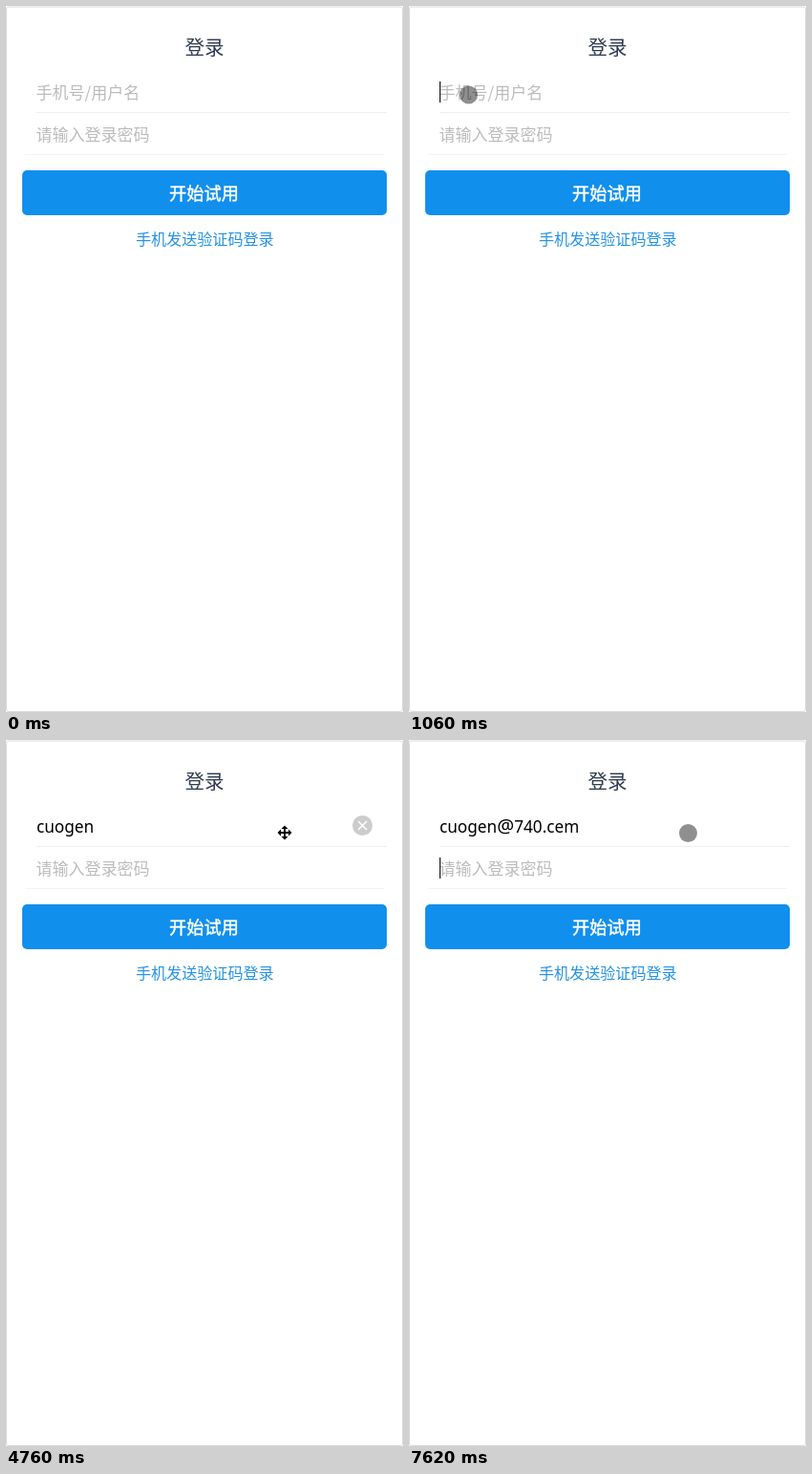
These frames come from a looping animation (416 by 739 pixels, 8 s). An HTML page:

```html
<!DOCTYPE html>
<html lang="zh-CN">
<head>
<meta charset="utf-8">
<title>登录</title>
<style>
  html, body { margin: 0; width: 100%; height: 100%; overflow: hidden; background: #fff; }
  svg { display: block; width: 416px; height: 739px; }
  text { font-family: "Noto Sans CJK SC", "Noto Sans CJK", sans-serif; }
  .mid { text-anchor: middle; }
  .hint { font-size: 17px; fill: #bbb; }
  #entry { font: 17.2px "Noto Sans", "Open Sans", sans-serif; fill: #000; }
</style>
</head>
<body>
<svg viewBox="0 0 416 739">
  <rect x=".5" y="1" width="415" height="737.5" rx="2.5" fill="#fff" stroke="#dcdcdc"/>
  <text class="mid" x="208" y="50.7" font-size="20.5" fill="#2f3b50">登录</text>

  <text class="hint" id="hint" x="31.5" y="97.3">手机号/用户名</text>
  <text id="entry" x="32" y="97"><tspan id="user"></tspan><tspan id="at" font-size="20"></tspan><tspan id="host"></tspan></text>
  <path id="wave" fill="none" stroke="#f00"/>
  <g id="clear">
    <circle cx="373.5" cy="89.5" r="10.5" fill="#ccc"/>
    <path d="M369 85l9 9m0-9l-9 9" stroke="#fff" stroke-width="1.5"/>
  </g>
  <path d="M32 111.5H399" stroke="#eee"/>
  <text class="hint" x="31.5" y="141.3">请输入登录密码</text>
  <path d="M20 155.5H396" stroke="#f2f2f2"/>

  <rect x="17" y="172" width="382" height="47" rx="5" fill="#118fed"/>
  <text class="mid" x="207.5" y="202.6" font-size="18.2" fill="#fff" stroke="#fff" stroke-width=".45">开始试用</text>
  <text class="mid" x="208.3" y="250.2" font-size="16.1" fill="#2492e6">手机发送验证码登录</text>

  <rect id="caret" width="1" height="22"/>
  <circle id="dot" r="9.5" fill-opacity=".44"/>
  <path id="cross" transform="translate(292 97)" stroke="#fff" paint-order="stroke"
    d="M0-7.5L3.5-4H1V-1H4V-3.5L7.5 0L4 3.5V1H1V4H3.5L0 7.5L-3.5 4H-1V1H-4V3.5L-7.5 0L-4-3.5V-1H-1V-4H-3.5Z"/>
</svg>
<script>
const LOOP = 8000, BLINK = 490;
const FOCUS = 1060, TAB = 7440;
const NAME = 'cuogen', HOST = '740.cem';
const $ = id => document.getElementById(id);
const show = (id, on) => { $(id).style.display = on ? '' : 'none'; };
const between = (t, a, b) => t >= a && t < b;
const progress = (t, a, b) => Math.min(1, Math.max(0, (t - a) / (b - a)));
const mix = (a, b, k) => a + (b - a) * k;
const easeOut = (k, power) => 1 - (1 - k) ** power;
const smooth = k => k * k * (3 - 2 * k);

// Evenly spaced keystrokes from one time to another
const burst = (from, to, n) =>
  Array.from({ length: n }, (_, i) => mix(from, to, n > 1 ? i / (n - 1) : 0));
const keys = [
  ...burst(2160, 2950, NAME.length),
  ...burst(5030, 5500, 3),
  ...burst(6290, 6290, 1),
  ...burst(6650, 7260, 4)
];

let wave = 'M32 101';
for (let x = 32; x < 92; x += 4) wave += 'l2-2l2 2';
$('wave').setAttribute('d', wave);

// Swoop in from below, settle on the field, later arc to the right
function pointer(t) {
  const swoop = progress(t, 320, 720);
  const settle = smooth(progress(t, 720, 910));
  const slide = smooth(progress(t, 3940, 4250));
  return [
    mix(339, 61, easeOut(swoop, 2.5)) + 1.5 * settle + 230 * slide,
    mix(736, 54, easeOut(swoop, 1.9)) + 39 * settle + 4.5 * slide + 15 * Math.sin(Math.PI * slide)
  ];
}

let typed = -1, width = 0;
function type(n) {
  if (n === typed) return;
  typed = n;
  $('user').textContent = NAME.slice(0, n);
  $('at').textContent = n > NAME.length ? '@' : '';
  $('host').textContent = HOST.slice(0, Math.max(0, n - NAME.length - 1));
  width = n ? $('entry').getComputedTextLength() : 0;
}

function draw(t) {
  type(keys.filter(k => t >= k).length);
  show('hint', !typed);
  show('clear', between(t, keys[0], 7620));
  show('wave', between(t, 5120, TAB));

  // The caret restarts its blink at each keystroke
  const password = t >= TAB;
  const idle = t - (typed ? keys[typed - 1] : FOCUS);
  show('caret', password || idle >= 0 && Math.floor(idle / BLINK) % 2 === 0);
  $('caret').setAttribute('x', password ? 32 : Math.round(32 + width));
  $('caret').setAttribute('y', password ? 123 : 79);

  const cross = between(t, 4760, 4940);
  show('cross', cross);
  show('dot', t >= 320 && !cross);
  const [x, y] = pointer(t);
  $('dot').setAttribute('cx', x);
  $('dot').setAttribute('cy', y);
}

const start = performance.now();
function tick() {
  draw((performance.now() - start) % LOOP);
  requestAnimationFrame(tick);
}
tick();
</script>
</body>
</html>
```
